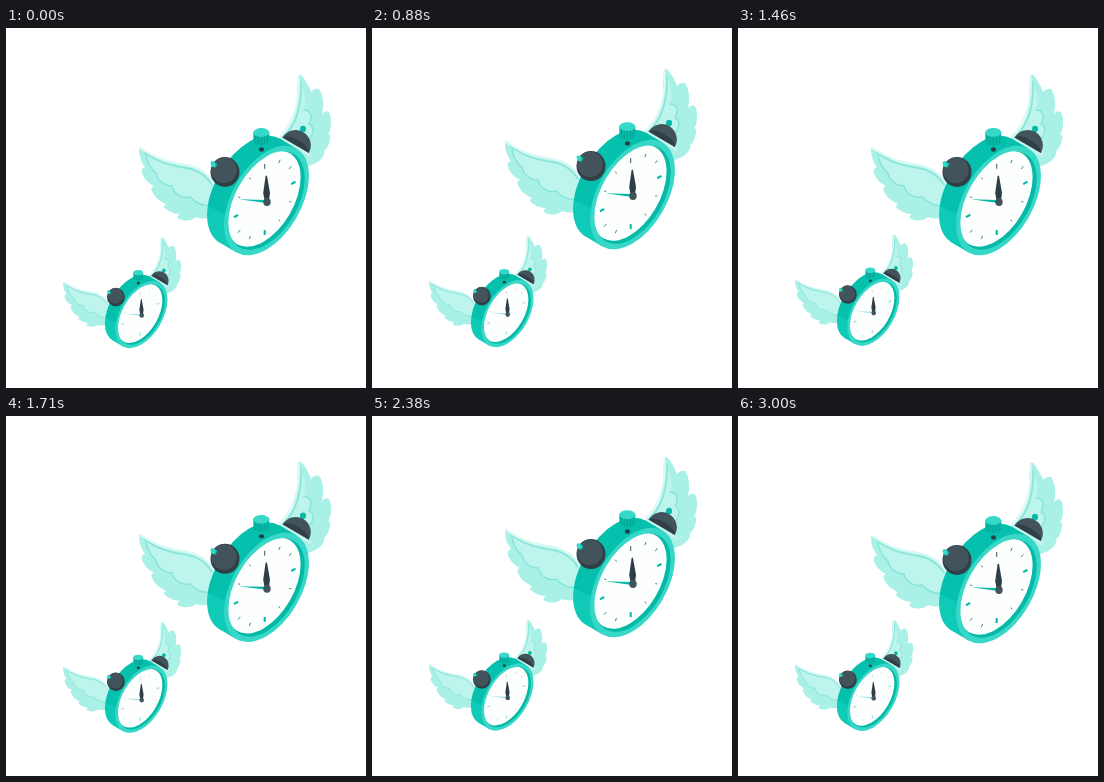
Animation, 360 px wide and 360 px high, one loop 3040 ms. Source, as an HTML page with a canvas:

```html
<!DOCTYPE html>
<html lang="en">
<head>
<meta charset="utf-8">
<title>Flying clocks</title>
<style>
html, body { margin: 0; width: 100%; height: 100%; overflow: hidden; background: #fff; }
canvas { display: block; width: 360px; height: 360px; }
</style>
</head>
<body>
<canvas id="stage"></canvas>
<script>
const SIZE = 360, LOOP = 3040, TAU = Math.PI * 2;
const canvas = document.getElementById('stage');
const ctx = canvas.getContext('2d');
const dpr = window.devicePixelRatio || 1;
canvas.width = canvas.height = SIZE * dpr;

const TEAL = '#05b9a7', SIDE = '#04c0ad', SIDE_LIT = '#0fcab7', RIM = '#38d8c8';
const DARK = '#42535c', SHADE = '#303e46', INK = '#2f3e46';
const FEATHER = '#a9f1e7', COVERT = '#bdf4ec', VANE = '#86e4d9', EDGE = '#def9f5';

const leftWing = {
  outer: 'M133 120 C133 118 136 120 140 123 C152 131 166 134 180 136 C192 138 202 144 207 154 L207 189 ' +
    'C202 191 196 191 190 189 C187 192 181 194 173 191 C171 190 171 188 174 186 C170 186 165 185 160 181 ' +
    'C158 180 157 178 160 176 C155 174 149 170 146 163 C145 161 145 159 148 158 C143 156 138 151 136 145 ' +
    'C135 142 136 140 139 139 C136 135 133 130 133 120 Z',
  covert: 'M140 126 C152 135 166 138 180 140 C194 142 203 148 207 156 L207 177 C198 179 189 175 184 169 ' +
    'C176 171 168 166 166 158 C158 158 151 152 150 145 C145 141 141 134 140 126 Z',
  vane: 'M138 124 C152 135 166 138 180 140 C193 142 201 149 206 157 M140 127 C141 134 145 141 150 145 ' +
    'C151 152 158 158 166 158 C168 166 176 171 184 169 C189 175 198 179 207 177',
  edge: 'M134 120 C152 132 166 135 180 137 C194 140 203 147 207 154'
};
const rightWing = {
  outer: 'M292 49 C293 45 296 47 299 52 C302 57 304 61 305 64 C307 62 310 60 313 61 C318 68 318 78 316 86 ' +
    'C319 83 322 82 324 86 C326 94 325 102 322 107 C324 106 325 108 324 111 C323 117 321 121 318 123 ' +
    'C319 124 318 127 316 130 C312 135 306 137 300 139 L274 110 C287 98 293 82 291 64 Z',
  covert: 'M295 56 C299 64 301 73 298 82 C305 82 307 88 303 96 C308 98 308 105 304 110 L298 122 L276 111 ' +
    'C290 97 296 80 295 56 Z',
  vane: 'M295 54 C296 80 290 97 276 111 M298 82 C305 82 307 88 303 96 C308 98 308 105 304 110',
  edge: 'M292.5 49 C294 73 289 93 274 108'
};
for (const wing of [leftWing, rightWing])
  for (const part in wing) wing[part] = new Path2D(wing[part]);

function stroke(path, color, width) {
  ctx.strokeStyle = color;
  ctx.lineWidth = width;
  ctx.stroke(path);
}

function fill(path, color) {
  ctx.fillStyle = color;
  ctx.fill(path);
}

function oval(x, y, rx, ry, color, turn = 0, from = 0, to = TAU) {
  ctx.beginPath();
  ctx.ellipse(x, y, rx, ry, turn, from, to);
  ctx.fillStyle = color;
  ctx.fill();
}

// Circle lying in the tilted plane of the dial
function disc(x, y, r, color) {
  oval(x, y, r, r * 0.577, color, -Math.PI / 3);
}

function dialPoint(angle, r) {
  return [258.7 + r * 0.707 * Math.cos(angle),
          171.5 + r * (0.816 * Math.sin(angle) - 0.408 * Math.cos(angle))];
}

function drawWing(wing) {
  fill(wing.outer, FEATHER);
  fill(wing.covert, COVERT);
  stroke(wing.vane, VANE, 1.4);
  stroke(wing.edge, EDGE, 2);
}

function drawRightBell() {
  oval(297, 101, 3, 3.3, TEAL);
  oval(289.5, 117.5, 15.2, 15.5, DARK, 0.53, Math.PI, TAU);
  oval(289.5, 117.5, 15.2, 6, SHADE, 0.53, Math.PI, TAU);
  stroke(new Path2D('M275 110.5 L304 127.5'), '#c8f3ed', 3);
}

function drawLeftBell() {
  oval(219, 144, 14.5, 15, SHADE);
  oval(218, 142.2, 12.8, 12.8, DARK, -0.5);
  ctx.lineCap = 'butt';
  stroke(new Path2D('M206.6 135.8 L210.5 138'), TEAL, 4.8);
  oval(207, 136, 2.2, 3, RIM, -0.5);
  ctx.lineCap = 'round';
}

// The face lies a little behind the rim, so the wall shows at lower right
function drawBody() {
  const side = ctx.createLinearGradient(206, 176, 203, 183);
  side.addColorStop(0.45, SIDE);
  side.addColorStop(0.55, SIDE_LIT);
  disc(243.5, 162.5, 60, side);
  fill(new Path2D('M273.5 110.5 L290.5 120.5 L230.5 224.5 L213.5 214.5 Z'), side);
  disc(260.5, 172.5, 60, RIM);
  disc(260.5, 172.5, 54, TEAL);
  ctx.save();
  ctx.clip();
  disc(257.5, 170.8, 52.5, '#fdfefe');
  ctx.restore();
}

function drawKnob() {
  oval(255.5, 121.5, 2.6, 2.2, INK);
  fill(new Path2D('M247.3 104 L247.3 114.5 Q255.3 121.5 263.3 114.5 L263.3 104 Z'), TEAL);
  for (let i = 0; i < 5; i++) {
    const x = 249.3 + i * 3;
    stroke(new Path2D(`M${x} 108 V${116.5 - Math.abs(i - 2) * 0.6}`), '#079c8e', 0.8);
  }
  oval(255.3, 104.5, 8, 4.4, RIM);
}

function drawTicks() {
  ctx.lineCap = 'butt';
  for (let i = 0; i < 12; i++) {
    const main = i % 3 === 0, angle = i * TAU / 12;
    const [x1, y1] = dialPoint(angle, main ? 37.5 : 40);
    const [x2, y2] = dialPoint(angle, 43.5);
    stroke(new Path2D(`M${x1} ${y1} L${x2} ${y2}`),
      i === 9 ? DARK : main ? TEAL : '#3c8c88', main && i !== 9 ? 2.1 : 1);
  }
  ctx.lineCap = 'round';
}

function drawHands() {
  fill(new Path2D('M233 171.3 L259 172 L260 175 Z'), TEAL);
}

function drawPointer() {
  fill(new Path2D('M259.6 148 Q260.3 147 261 148 L264 165 L262.6 175 L259 175 L257.2 165 Z'), INK);
  oval(261, 174, 3.7, 4, DARK);
}

function drawClock(x, y, scale) {
  ctx.save();
  ctx.translate(x, y);
  ctx.scale(scale, scale);
  drawWing(leftWing);
  drawWing(rightWing);
  drawRightBell();
  drawBody();
  drawKnob();
  // Fine detail fades with distance
  ctx.globalAlpha = scale * scale;
  drawTicks();
  drawHands();
  ctx.globalAlpha = 1;
  drawPointer();
  drawLeftBell();
  ctx.restore();
}

const drift = [[0, 0], [460, -0.2], [1250, -1.6], [1710, -3.3], [2080, -4.8], [2630, -6.1], [LOOP, -5.1]];

function driftAt(t) {
  const i = drift.findIndex(key => key[0] > t);
  const [t0, y0] = drift[i - 1], [t1, y1] = drift[i];
  return y0 + (y1 - y0) * (t - t0) / (t1 - t0);
}

function draw(t) {
  ctx.setTransform(dpr, 0, 0, dpr, 0, 0);
  ctx.fillStyle = '#fff';
  ctx.fillRect(0, 0, SIZE, SIZE);
  ctx.lineCap = ctx.lineJoin = 'round';
  const bob = -3.2 * (1 - Math.cos(TAU * t / 1500));
  const k = 0.615;
  drawClock(0, bob, 1);
  drawClock(57 - 133 * k, 209.3 - 47 * k + driftAt(t), k);
}

let start;
function tick(now) {
  if (start === undefined) start = now;
  draw(Math.max(0, now - start) % LOOP);
  requestAnimationFrame(tick);
}
draw(0);
requestAnimationFrame(tick);
</script>
</body>
</html>
```
